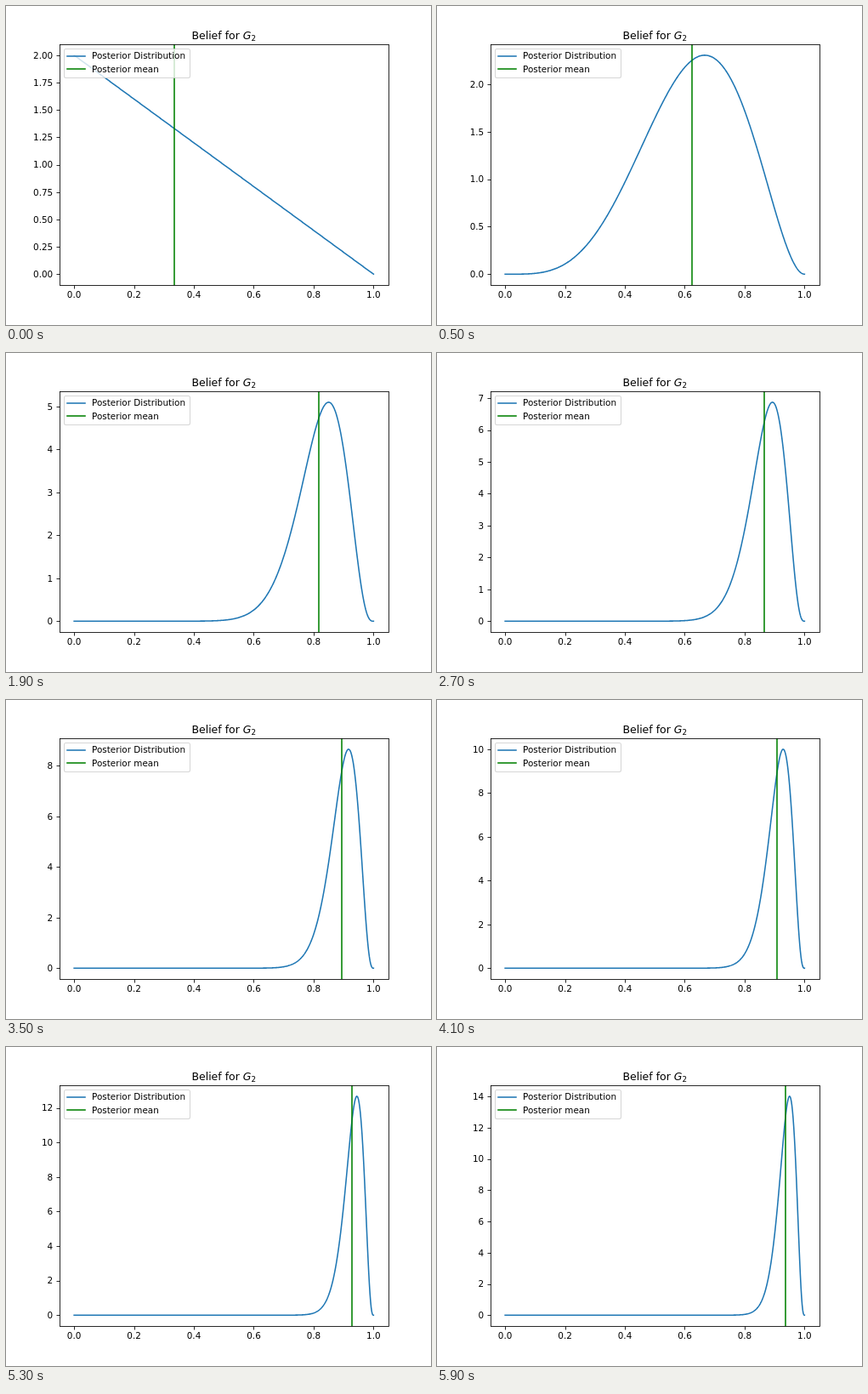
An HTML page with a canvas for the animation above (6 s loop, 500 px wide and 375 px high).

```html
<!DOCTYPE html>
<html lang="en">
<head>
<meta charset="utf-8">
<title>Posterior belief</title>
<style>
  html, body { margin: 0; width: 100%; height: 100%; overflow: hidden; background: #fff; }
  canvas { display: block; }
</style>
</head>
<body>
<canvas id="stage" width="500" height="375"></canvas>
<script>
const ctx = document.getElementById('stage').getContext('2d');
const STEP_MS = 100, STEPS = 60;
const PT = 75 / 72; // pixels per point
const BLUE = '#1f77b4', GREEN = '#008000';
const box = { left: 62.5, right: 450, top: 45, bottom: 328.125 };

// Data fills the axes with a 5% margin on every side.
const spanX = (box.right - box.left) / 1.1;
const spanY = (box.bottom - box.top) / 1.1;
const toX = v => box.left + spanX * (v + 0.05);
const toY = v => box.bottom - spanY * (v + 0.05);
const crisp = v => Math.floor(v + 0.5) + 0.5;

const failureSteps = [0, 2, 6];
const factorial = n => n < 2 ? 1 : n * factorial(n - 1);

// Beta posterior after step + 1 trials, starting from Beta(1, 1).
function posterior(step) {
  const failures = failureSteps.filter(s => s <= step).length;
  const a = step + 2 - failures, b = 1 + failures;
  const shape = x => x ** (a - 1) * (1 - x) ** (b - 1);
  const top = shape((a - 1) / (a + b - 2));
  const scale = factorial(a + b - 1) / (factorial(a - 1) * factorial(b - 1));
  return { mean: a / (a + b), peak: top * scale, relative: x => shape(x) / top };
}

// Smallest round step giving at most nine intervals.
function tickStep(range) {
  const raw = range / 9;
  const unit = 10 ** Math.floor(Math.log10(raw));
  return unit * [1, 2, 2.5, 5, 10].find(m => m * unit >= raw);
}

function font(points, style = '') {
  ctx.font = `${style} ${points * PT}px "DejaVu Sans", sans-serif`;
}

function text(str, x, y, align = 'left') {
  ctx.fillStyle = '#000';
  ctx.textAlign = align;
  ctx.fillText(str, x, y);
}

function line(points, color, width, cap = 'square') {
  ctx.beginPath();
  points.forEach(([x, y]) => ctx.lineTo(x, y));
  ctx.strokeStyle = color;
  ctx.lineWidth = width * PT;
  ctx.lineCap = cap;
  ctx.lineJoin = 'round';
  ctx.stroke();
}

function drawData({ mean, relative }) {
  ctx.save();
  ctx.beginPath();
  ctx.rect(box.left, box.top, box.right - box.left, box.bottom - box.top);
  ctx.clip();
  const curve = Array.from({ length: 501 }, (_, i) => [toX(i / 500), toY(relative(i / 500))]);
  line(curve, BLUE, 1.5);
  const x = Math.floor(toX(mean) + 0.5);
  line([[x, box.top], [x, box.bottom]], GREEN, 1.5);
  ctx.restore();
}

function drawAxes(peak) {
  const left = crisp(box.left), bottom = crisp(box.bottom);
  ctx.strokeStyle = '#000';
  ctx.lineWidth = 0.8 * PT;
  ctx.lineJoin = 'miter';
  ctx.strokeRect(left, crisp(box.top), crisp(box.right) - left, bottom - crisp(box.top));

  font(10);
  for (let i = 0; i <= 5; i++) {
    const x = toX(i / 5);
    line([[crisp(x), bottom], [crisp(x), bottom + 4]], '#000', 0.8, 'butt');
    text((i / 5).toFixed(1), x, 343, 'center');
  }

  const step = tickStep(peak * 1.1);
  const digits = step >= 1 ? 0 : step === 0.25 ? 2 : 1;
  for (let i = 0; i * step <= peak * 1.05; i++) {
    const y = toY(i * step / peak);
    line([[left, crisp(y)], [left - 4, crisp(y)]], '#000', 0.8, 'butt');
    text((i * step).toFixed(digits), box.left - 7 * PT, Math.round(y + 3.8), 'right');
  }
}

function drawTitle() {
  const parts = [['Belief for ', 12, '', 0], ['G', 12, 'italic', 0], ['2', 8.4, '', 2]];
  let x = 218.4;
  for (const [str, size, style, drop] of parts) {
    font(size, style);
    text(str, x, 39 + drop);
    x += ctx.measureText(str).width;
  }
}

function drawLegend() {
  ctx.beginPath();
  ctx.roundRect(68.5, 50.5, 148, 34, 2);
  ctx.fillStyle = 'rgba(255,255,255,0.8)';
  ctx.fill();
  ctx.strokeStyle = 'rgba(204,204,204,0.8)';
  ctx.lineWidth = PT;
  ctx.stroke();
  font(10);
  [['Posterior Distribution', BLUE, 59, 62], ['Posterior mean', GREEN, 74, 78]]
    .forEach(([label, color, y, baseline]) => {
      line([[72, y], [93, y]], color, 1.5);
      text(label, 101, baseline);
    });
}

function draw(now) {
  const state = posterior(Math.floor(now / STEP_MS) % STEPS);
  ctx.fillStyle = '#fff';
  ctx.fillRect(0, 0, 500, 375);
  drawData(state);
  drawAxes(state.peak);
  drawTitle();
  drawLegend();
}

const start = performance.now();
function tick() {
  draw(performance.now() - start);
  requestAnimationFrame(tick);
}
tick();
</script>
</body>
</html>
```
